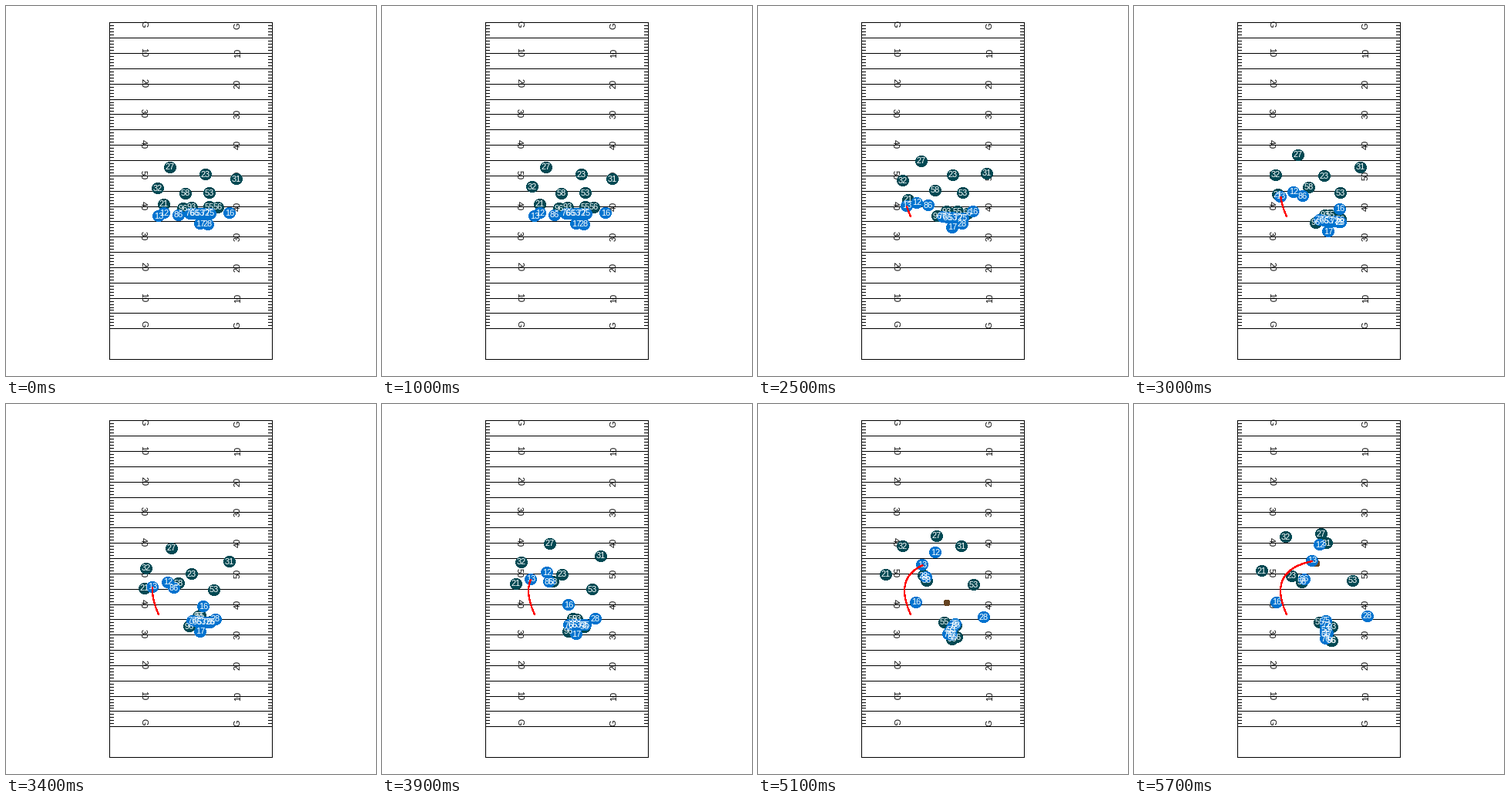
Animation of 480x480 px, one loop 5.8 s. Source, as a matplotlib script:

```python
import matplotlib.pyplot as plt
import numpy as np
from matplotlib.animation import FuncAnimation
from matplotlib.patches import Circle

SIZE, DPI = 480, 80
PX = 72 / DPI
FRAMES, INTERVAL = 58, 100
TEAL, BLUE, BROWN = "#004953", "#0073cf", "#654321"
FONT = dict(family="Liberation Sans", size=11 * PX, ha="center", va="center")

LEFT, RIGHT, TOP, BOTTOM = 134, 345, 21, 458
YARD = 3.97
SNAP, MIDWAY, THROW, END = 1.8, 3.9, 4.6, 5.7
CATCH_SPOT = np.array([237, 207])

fig = plt.figure(figsize=(SIZE / DPI, SIZE / DPI), dpi=DPI, facecolor="white")
ax = fig.add_axes([0, 0, 1, 1])
ax.set_xlim(0, SIZE)
ax.set_ylim(SIZE, 0)
ax.axis("off")


def line(x0, y0, x1, y1):
    ax.plot([x0, x1], [y0, y1], color="black", lw=PX,
            antialiased=False, zorder=1)


def yard_y(yards):
    return round(TOP + 0.3 + yards * YARD)


def draw_field():
    for x in (LEFT, RIGHT):
        line(x, TOP, x, BOTTOM)
    line(LEFT, BOTTOM, RIGHT, BOTTOM)
    for yards in range(101):
        y = yard_y(yards)
        if yards % 5 == 0:
            line(LEFT, y, RIGHT, y)
        else:
            line(LEFT, y, LEFT + 5, y)
            line(RIGHT - 5, y, RIGHT, y)
    for x, angle, goal_offset in ((178, 270, 2.5), (301, 90, 4.5)):
        for yards in range(0, 101, 10):
            text = str(min(yards, 100 - yards))
            y = yard_y(yards) - 0.5
            if yards in (0, 100):
                text = "G"
                y = TOP + goal_offset if yards == 0 else y - 8 + goal_offset
            ax.text(x, y, text, rotation=angle, zorder=2, **FONT)


def effort(t):
    """Running time since the snap, with a short acceleration."""
    s = max(t - SNAP, 0)
    return s * s / (s + 0.5)


def run(start, mid, end, t):
    """Parabola from rest at the snap, through mid, to end."""
    w, m, e = effort(t), effort(MIDWAY), effort(END)
    start, mid, end = (np.array(p, float) for p in (start, mid, end))
    speed_mid, speed_end = (mid - start) / m, (end - start) / e
    bend = (speed_end - speed_mid) / (e - m)
    return start + w * (speed_mid + bend * (w - m))


def disc(radius, color, zorder):
    return ax.add_patch(Circle((0, 0), radius, fc=color, ec="none", snap=False,
                               antialiased=False, zorder=zorder))


class Player:
    def __init__(self, number, color, start, mid, end, creep=0):
        self.route = start, mid, end
        self.creep = creep
        self.dot = disc(7.2, color, 3 if color == TEAL else 5)
        self.label = ax.text(0, 0, str(number), color="white", zorder=6, **FONT)

    def at(self, t):
        return run(*self.route, t) + self.creep * max(1 - t / SNAP, 0)

    def move(self, t):
        x, y = np.round(self.at(t))
        self.dot.center = x, y - 0.5
        self.label.set_position((x, y - 0.5))


draw_field()

defense = [
    Player(27, TEAL, (213, 210), (218, 182), (243, 169)),
    Player(32, TEAL, (193, 233), (181, 206), (197, 173), creep=4),
    Player(23, TEAL, (259, 219), (234, 222), (205, 224)),
    Player(31, TEAL, (299, 225), (284, 198), (250, 181)),
    Player(58, TEAL, (233, 244), (222, 231), (218, 232)),
    Player(53, TEAL, (264, 243), (273, 241), (284, 230)),
    Player(21, TEAL, (205, 258), (174, 234), (166, 217)),
    Player(96, TEAL, (230, 263), (242, 296), (257, 308)),
    Player(93, TEAL, (241, 262), (253, 280), (257, 290)),
    Player(55, TEAL, (264, 261), (248, 279), (241, 284)),
    Player(56, TEAL, (275, 262), (263, 290), (256, 308)),
]

receiver = Player(13, BLUE, (198, 273), (193, 228), (231, 204))
passer = Player(17, BLUE, (252, 283), (252, 299), (251, 298))
offense = [
    receiver,
    passer,
    Player(12, BLUE, (205, 269), (214, 219), (241, 183)),
    Player(86, BLUE, (224, 272), (217, 231), (221, 228)),
    Player(16, BLUE, (290, 269), (242, 261), (185, 258)),
    Player(28, BLUE, (262, 284), (277, 279), (303, 276)),
]
# The line is an even row that bunches up and turns into a column.
for i, number in enumerate((76, 66, 53, 72, 75)):
    offense.append(Player(number, BLUE, (239 + 6.4 * i, 270),
                          (243 + 5.2 * i, 287), (249, 305 - 5.7 * i)))
players = defense + offense

ball = disc(4, BROWN, 4)
trail, = ax.plot([], [], color="red", lw=1.2 * PX, antialiased=False, zorder=7)


def ball_at(t):
    spot = np.array([246, 267])
    if t < THROW:
        snapped = np.clip((t - SNAP) / 0.3 + 1, 0, 1)
        return spot + (passer.at(t) - spot) * snapped
    flight = (t - THROW) / (END - THROW)
    return passer.at(THROW) + (CATCH_SPOT - passer.at(THROW)) * flight


def update(frame):
    times = np.arange(frame + 1) * INTERVAL / 1000
    t = times[-1]
    for player in players:
        player.move(t)
    ball.center = tuple(np.round(ball_at(t)))
    trail.set_data(*np.transpose([receiver.at(past) for past in times]))
    return [trail]


anim = FuncAnimation(fig, update, frames=FRAMES, interval=INTERVAL,
                     repeat=True, repeat_delay=0)
plt.show()
```
